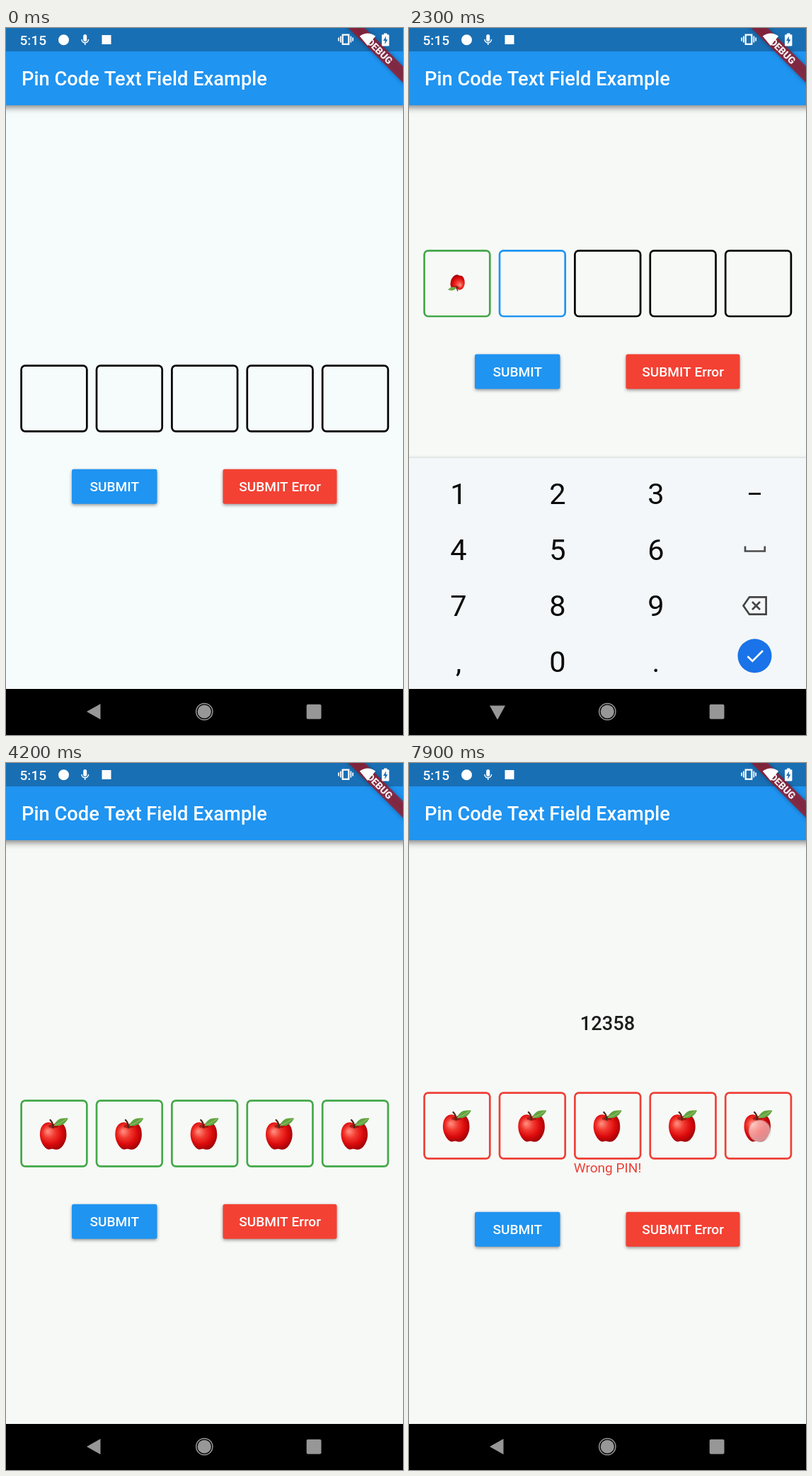
An HTML page with a canvas for the animation above (8 s loop, 561x998 px).

```html
<!DOCTYPE html>
<html lang="en">
<head>
<meta charset="utf-8">
<title>Pin Code Text Field Example</title>
<style>
html, body { margin: 0; width: 100%; height: 100%; overflow: hidden; background: #f7f9f7; }
canvas { display: block; width: 561px; height: 998px; }
</style>
</head>
<body>
<canvas id="stage" width="561" height="998"></canvas>
<script>
const ctx = document.getElementById('stage').getContext('2d');
const W = 561, H = 998, LOOP = 8000, STEP = 100;
const BLUE = '#1f94f1', RED = '#f34133', GREEN = '#43a848';
const KEY_X = [70, 210, 349, 488.5];
const KEYS_TOP = 607, NAV_TOP = 933;
const DIGIT_STARTS = [2140, 2550, 2990, 3370, 3690];
const SPIN = 300;

// from, to, x, y
const TOUCHES = [
  [1100, 1200, 68, 524],
  [2000, 2200, 70, 658],
  [2500, 2600, 210, 658],
  [2900, 3000, 349, 658],
  [3300, 3400, 210, 737],
  [3600, 3700, 210, 816],
  [5100, 5200, 150, 646],
  [6100, 6200, 150, 639],
  [7000, 7100, 387, 647],
  [7900, 8000, 495.5, 519.5]
];

const clamp = (v, lo = 0, hi = 1) => Math.min(hi, Math.max(lo, v));

function rect(x, y, w, h, color) {
  ctx.fillStyle = color;
  ctx.fillRect(x, y, w, h);
}

function roundRect(x, y, w, h, r) {
  ctx.beginPath();
  ctx.roundRect(x, y, w, h, r);
}

function disc(x, y, r, color) {
  ctx.fillStyle = color;
  ctx.beginPath();
  ctx.arc(x, y, r, 0, 7);
  ctx.fill();
}

function trace(points, close) {
  ctx.beginPath();
  points.forEach(([x, y]) => ctx.lineTo(x, y));
  if (close) ctx.closePath();
}

function poly(points, color) {
  trace(points, true);
  ctx.fillStyle = color;
  ctx.fill();
}

function line(points, color, width, close) {
  trace(points, close);
  ctx.strokeStyle = color;
  ctx.lineWidth = width;
  ctx.stroke();
}

function text(str, x, y, size, color, weight = 500, align = 'center') {
  ctx.font = `${weight} ${size}px Roboto, sans-serif`;
  ctx.textAlign = align;
  ctx.fillStyle = color;
  ctx.fillText(str, x, y);
}

function withShadow(blur, dy, alpha, draw) {
  ctx.save();
  ctx.shadowColor = `rgba(0,0,0,${alpha})`;
  ctx.shadowBlur = blur;
  ctx.shadowOffsetY = dy;
  draw();
  ctx.restore();
}

const BODY = new Path2D('M-1-13C-6-18-19-17-20 0C-20.5 12-12 23-7 22.5C-4 22-3 21.5-1 22' +
  'C2 23 6 23.5 10 20C16 14 18 6 17.5 0C17-16 6-18-1-13Z');
const LEAF = new Path2D('M0-11C3-20 9-22.5 20-21.5C16-13 9-9.5 0-11Z');
const VEIN = new Path2D('M1-11.5Q9-14 17-20');
const STEM = new Path2D('M-1.5-8Q-1-15-5.5-19');

function apple(x, y, p) {
  if (p <= 0) return;
  ctx.save();
  ctx.translate(x, y);
  ctx.rotate(p * Math.PI * 2);
  ctx.scale(p, p);
  const skin = ctx.createRadialGradient(-9, -3, 1, -3, 1, 24);
  skin.addColorStop(0, '#ff8a7c');
  skin.addColorStop(0.32, '#f23a30');
  skin.addColorStop(0.65, '#dc0a0c');
  skin.addColorStop(1, '#920308');
  ctx.fillStyle = skin;
  ctx.fill(BODY);
  ctx.fillStyle = 'rgba(110,0,0,.5)';
  ctx.beginPath();
  ctx.ellipse(-1, -10, 7, 2.6, 0, 0, 7);
  ctx.fill();
  ctx.lineCap = 'round';
  ctx.strokeStyle = '#4a2a18';
  ctx.lineWidth = 2.2;
  ctx.stroke(STEM);
  ctx.fillStyle = '#62a440';
  ctx.fill(LEAF);
  ctx.strokeStyle = '#9cc878';
  ctx.lineWidth = 1;
  ctx.stroke(VEIN);
  ctx.restore();
}

function fields(t, top, typing, failed) {
  const filled = DIGIT_STARTS.filter(s => t >= s).length;
  for (let i = 0; i < 5; i++) {
    const x = 20.2 + i * 106.4;
    let color = '#000';
    if (failed) color = '#ee4035';
    else if (i < filled) color = GREEN;
    else if (typing && i === filled) color = BLUE;
    roundRect(x + 1.4, top + 1.4, 92.7, 92.7, 5.5);
    ctx.strokeStyle = color;
    ctx.lineWidth = 2.7;
    ctx.stroke();
    apple(x + 47.7, top + 47.7, clamp((t - DIGIT_STARTS[i]) / SPIN));
  }
}

function button(label, x, y, w, color, splash) {
  withShadow(4, 2, 0.38, () => {
    roundRect(x, y, w, 49, 2.7);
    ctx.fillStyle = color;
    ctx.fill();
  });
  if (splash > 0) {
    ctx.save();
    roundRect(x, y, w, 49, 2.7);
    ctx.clip();
    disc(x + w / 2, y + 24, splash, 'rgba(255,255,255,.22)');
    ctx.restore();
  }
  text(label, x + w / 2, y + 31.3, 19.1, '#fff');
}

function splashSize(t, from) {
  return t >= from && t < from + 200 ? 28 + (t - from) * 0.4 : 0;
}

function keyboard(dy, color) {
  ctx.save();
  ctx.beginPath();
  ctx.rect(0, 0, W, NAV_TOP);
  ctx.clip();
  ctx.translate(0, dy);
  withShadow(3, -1, 0.14, () => rect(-5, KEYS_TOP, W + 10, 340, color));
  ['123', '456', '789', ',0.'].forEach((row, r) =>
    [...row].forEach((key, c) => text(key, KEY_X[c], 672.3 + r * 79, 41.5, '#0a0a0a', 400)));
  rect(480, 656, 17, 3, '#1a1a1a');
  ctx.lineJoin = 'miter';
  line([[475, 731.5], [475, 738.5], [502.8, 738.5], [502.8, 731.5]], '#4c4c4c', 2.7);
  line([[472.5, 815.5], [481, 803.3], [504.6, 803.3], [504.6, 827.7], [481, 827.7]], '#444', 2.7, true);
  line([[485, 810], [496, 821]], '#444', 2.7);
  line([[496, 810], [485, 821]], '#444', 2.7);
  disc(488.5, 886.3, 24, '#1a73e8');
  line([[478.5, 887], [485.3, 893.7], [500, 879]], '#fff', 2.7);
  ctx.restore();
}

function banner() {
  ctx.save();
  ctx.translate(W, 0);
  ctx.rotate(Math.PI / 4);
  withShadow(6, 0, 0.4, () => rect(-80, 38.2, 160, 16.4, 'rgba(156,26,42,.8)'));
  text('DEBUG', 0, 51.4, 13.9, '#f3eef0', 900);
  ctx.restore();
}

function statusIcons() {
  const white = '#fff';
  text('5:15', 19.5, 23.6, 19.1, white, 500, 'left');
  disc(81.5, 16.8, 7.5, white);

  roundRect(109.2, 9, 5, 10, 2.5);
  ctx.fillStyle = white;
  ctx.fill();
  ctx.strokeStyle = white;
  ctx.lineWidth = 1.5;
  ctx.beginPath();
  ctx.arc(111.7, 16, 4.8, 0, Math.PI);
  ctx.moveTo(111.7, 20.5);
  ctx.lineTo(111.7, 24);
  ctx.stroke();

  rect(135.5, 10, 13, 13, white);

  ctx.lineWidth = 2.2;
  ctx.strokeRect(475.7, 9.6, 8.6, 13.2);
  [[470, 13.5, 5], [472.8, 11.5, 9], [487.3, 11.5, 9], [490.1, 13.5, 5]]
    .forEach(([x, y, h]) => rect(x - 0.8, y, 1.7, h, white));

  ctx.fillStyle = white;
  ctx.beginPath();
  ctx.moveTo(511, 25);
  ctx.lineTo(499.8, 11.4);
  ctx.quadraticCurveTo(511, 3.6, 522.2, 11.4);
  ctx.fill();

  rect(534, 7.5, 4.5, 3, white);
  roundRect(531, 9.2, 10.4, 16.3, 1.2);
  ctx.fillStyle = white;
  ctx.fill();
  poly([[537, 11.5], [533, 18], [535.6, 18], [535.2, 23], [539.4, 16.3], [536.8, 16.3]], '#1a6fb3');
}

function navBar(keysShown) {
  const gray = '#979797';
  rect(0, NAV_TOP, W, H - NAV_TOP, '#000');
  if (keysShown) poly([[114, 956.5], [136, 956.5], [125, 976.5]], gray);
  else poly([[114, 965], [133.5, 954], [133.5, 976]], gray);
  disc(280.3, 965, 9.6, gray);
  ctx.strokeStyle = gray;
  ctx.lineWidth = 1.5;
  ctx.beginPath();
  ctx.arc(280.3, 965, 11.6, 0, 7);
  ctx.stroke();
  roundRect(424.7, 954.7, 20.8, 20.8, 2);
  ctx.fillStyle = gray;
  ctx.fill();
}

function touch(x, y) {
  const glow = ctx.createRadialGradient(x, y, 0, x, y, 16.5);
  glow.addColorStop(0, 'rgba(255,255,255,.48)');
  glow.addColorStop(0.85, 'rgba(250,250,250,.58)');
  glow.addColorStop(0.93, 'rgba(205,205,205,.5)');
  glow.addColorStop(1, 'rgba(150,150,150,0)');
  disc(x, y, 16.5, glow);
}

function keyboardDrop(t) {
  if (t < 1200 || t >= 4000) return null;
  if (t < 1300) return 90;
  return t < 3900 ? 0 : 150;
}

function draw(t) {
  const raised = t >= 1200 && t < 3900;
  const typing = t >= 1100 && t < 3900;
  const failed = t >= 7100;
  const lift = raised ? -162.3 : 0;
  const spread = failed ? 11 : 0;
  const drop = keyboardDrop(t);

  rect(0, 0, W, H, t < 1200 ? '#f6fbfb' : t < 1700 ? '#f8f9fa' : '#f7f9f7');
  withShadow(9, 3, 0.5, () => rect(-10, 33, W + 20, 76, BLUE));
  rect(0, 0, W, 33, '#196fb4');
  text('Pin Code Text Field Example', 22, 81, 27.3, '#fff', 500, 'left');

  if (t >= 5200) text('12358', 280.5, 388 - spread, 27.3, '#1c1c1c');
  fields(t, 475.2 + lift - spread, typing, failed);
  if (failed) text('Wrong PIN!', 280.5, 577.5, 19.1, '#ea4237', 400);
  const row = 622.7 + lift + spread;
  button('SUBMIT', 93, row, 120.5, BLUE, splashSize(t, 5100));
  button('SUBMIT Error', 306.5, row, 161, RED, splashSize(t, 7000));

  if (drop !== null) keyboard(drop, t < 1700 ? '#f8f9fb' : '#f4f7f9');
  banner();
  statusIcons();
  navBar(raised);
  TOUCHES.forEach(([from, to, x, y]) => {
    if (t >= from && t < to) touch(x, y);
  });
}

const start = performance.now();
function tick() {
  const t = (performance.now() - start) % LOOP;
  draw(Math.floor(t / STEP) * STEP);
  requestAnimationFrame(tick);
}
tick();
</script>
</body>
</html>
```
